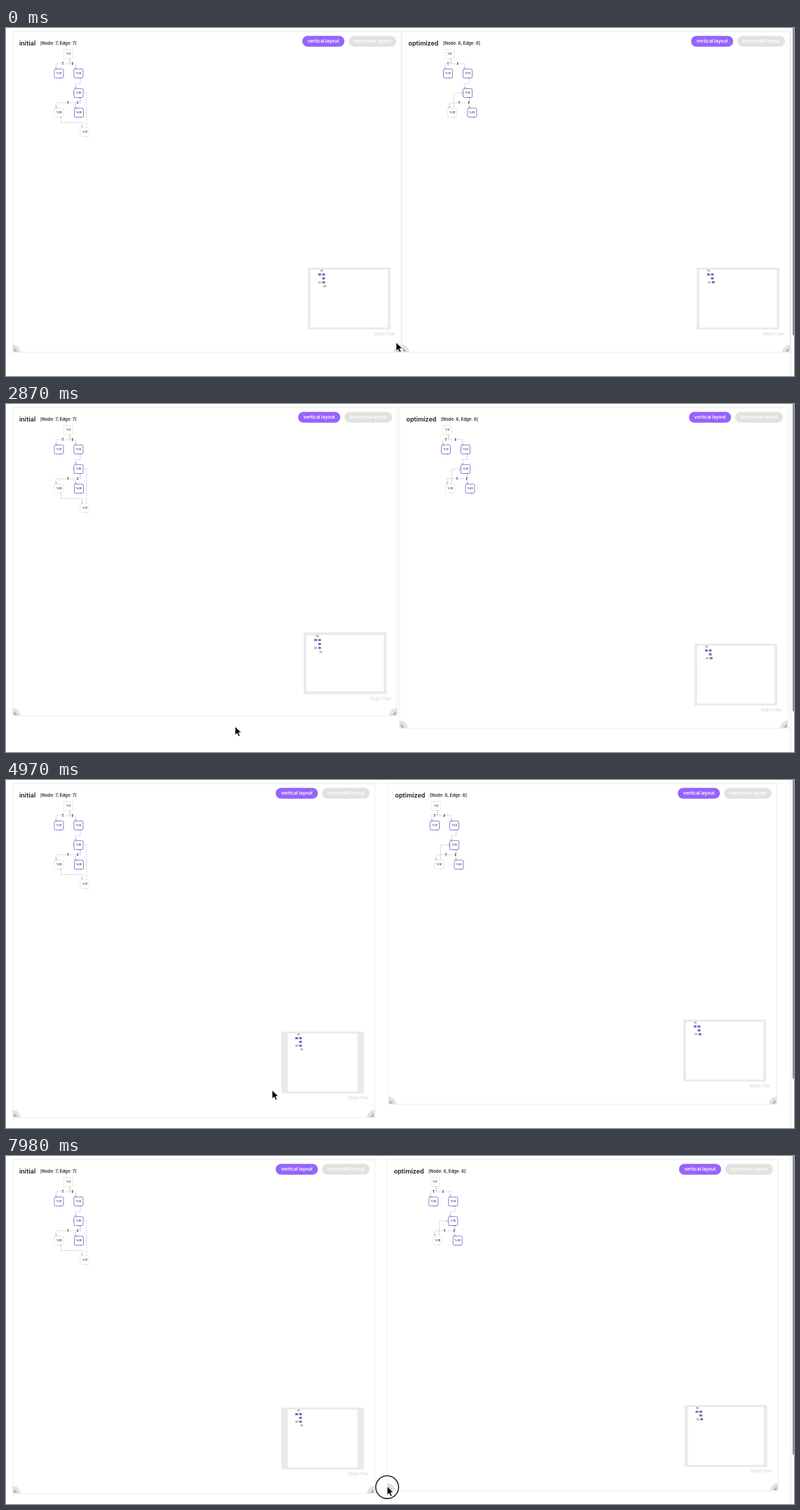
Write an HTML page that moves like this. It is 1125 px wide and 498 px high and loops after 8 s.

```html
<!DOCTYPE html>
<html lang="en">
<head>
<meta charset="utf-8">
<style>
  html, body { margin: 0; width: 100%; height: 100%; overflow: hidden; background: #fff; }
  svg { display: block; width: 1125px; height: 498px; font-family: Inter, sans-serif; }
  .frame { fill: #fff; stroke: #ececec; stroke-width: .9; }
  .title { font-size: 9px; font-weight: 600; fill: #1d1d1f; }
  .count { font-size: 6.1px; font-weight: 600; fill: #2b2b2b; }
  .button { font-size: 6.55px; font-weight: 600; fill: #fff; text-anchor: middle; }
  .credit { font-size: 5.7px; fill: #d2d2d2; text-anchor: end; }
  .edge { fill: none; stroke: #a5a3ad; stroke-width: .75; stroke-dasharray: 1.55; }
  .edge.violet { stroke: #a596d8; }
  .node { fill: #fff; stroke: #dcdcdc; stroke-width: .6; }
  .node.active { stroke: #7657d6; stroke-width: .8; }
  .name { font-size: 3.7px; font-weight: 600; fill: #333; text-anchor: middle; }
  .branch { font-size: 4.6px; font-weight: 700; fill: #222; text-anchor: middle; }
  .mark { fill: none; stroke: #777; stroke-width: .9; }
</style>
</head>
<body>
<svg id="stage" viewBox="0 0 1125 498">
  <defs>
    <marker id="tip" markerUnits="userSpaceOnUse" markerWidth="4" markerHeight="4" refX="1.6" refY="2" orient="auto">
      <path d="M.6 .6L2.1 2L.6 3.4" fill="none" stroke="#8c8a94" stroke-width=".7"/>
    </marker>
    <clipPath id="page"><rect width="1120" height="498"/></clipPath>
  </defs>
  <path d="M9.5 4.8H1110.5V0" fill="none" stroke="#f0f0f0" stroke-width=".8"/>
  <g id="panels" clip-path="url(#page)"></g>
  <path d="M1120.5 0V498" stroke="#e6e6e6"/>
  <rect id="thumb" x="1123" y="-4" width="4" rx="2" fill="#8f8f8f"/>
  <g id="pointer">
    <circle id="ring" r="16.3" fill="none" stroke="#111" stroke-width="1.4"/>
    <path id="arrow" d="M0 -1V11.2L2.9 8.5L4.9 13L7 12.1L5 7.7H8.8Z" fill="#000" stroke="#fff" stroke-width=".7"/>
    <path id="resize" d="M-2.2 -2.5L2.9 -1.9L1.4 -.6L4 1.8L5.4 .5L6 6.1L.5 5.4L1.9 4L-.7 1.5L-2 2.9Z" fill="#000" stroke="#fff" stroke-width=".4"/>
  </g>
</svg>
<script>
const LOOP = 8000, STEP = 70, LEFT = 9.5, TOP = 5.5, RIGHT = 1120;
const byId = id => document.getElementById(id);

function add(parent, tag, attrs, text) {
  const el = document.createElementNS('http://www.w3.org/2000/svg', tag);
  set(el, attrs);
  if (text) el.textContent = text;
  return parent.appendChild(el);
}
function set(el, attrs) {
  for (const key in attrs) el.setAttribute(key, attrs[key]);
}
const move = (el, x, y) => el.setAttribute('transform', `translate(${x} ${y})`);

// Pointer path: time, x, y
const path = [
  [0, 557, 451], [560, 558, 462], [910, 556.5, 465], [1260, 557.3, 474], [1450, 559, 477],
  [1700, 566, 380], [1850, 575, 325], [1960, 582, 339], [2030, 587.5, 351], [2250, 575, 400],
  [2480, 550.5, 447], [2600, 545, 448], [2900, 300, 463], [3200, 40, 445], [3360, 22.5, 440],
  [3710, 101, 364], [3780, 101, 364], [4000, 98, 380], [4200, 75, 440], [4400, 56, 472],
  [4520, 54.5, 477], [4700, 80, 478], [4970, 380, 445], [5300, 530, 452], [5880, 549, 458],
  [6200, 540, 420], [6440, 525, 358], [6510, 517, 352], [6790, 509, 335], [7150, 515, 370],
  [7560, 537, 446], [7910, 545.5, 473], [8000, 544, 474]
];

// Cubic interpolation whose tangents vanish at turning points
function slope(i, axis) {
  const a = path[i - 1], b = path[i], c = path[i + 1];
  if (!a || !c) return 0;
  const before = (b[axis] - a[axis]) / (b[0] - a[0]);
  const after = (c[axis] - b[axis]) / (c[0] - b[0]);
  return before * after > 0 ? 2 * before * after / (before + after) : 0;
}
function pointerAt(t) {
  let i = 0;
  while (i < path.length - 2 && path[i + 1][0] < t) i++;
  const span = path[i + 1][0] - path[i][0], u = (t - path[i][0]) / span, v = 1 - u;
  const [x, y] = [1, 2].map(axis =>
    v * v * (1 + 2 * u) * path[i][axis] + u * u * (3 - 2 * u) * path[i + 1][axis] +
    span * u * v * (v * slope(i, axis) - u * slope(i + 1, axis)));
  return { x, y };
}

const drags = [[910, 2480], [3360, 4520], [5880, 8000]];
function dragged(index, t) {
  const [from, to] = drags[index], start = pointerAt(from);
  const now = pointerAt(Math.min(to, Math.max(from, t - STEP)));
  return { x: now.x - start.x, y: now.y - start.y };
}

const graphs = [
  {
    title: 'initial', count: '[Node: 7, Edge: 7]', countX: 39.5,
    nodes: [['%0', 79.5, 37], ['%12', 66, 65, 1], ['%14', 94, 65, 1], ['%15', 94, 93, 1],
      ['%18', 66, 121], ['%28', 94.5, 121, 1], ['%31', 103, 149]],
    edges: ['M81.5 43V51H62V57', 'M81.5 43V51H90V57', 'M96.5 100V107H62V113',
      'M69 128V135.5H99V141', 'M105.5 156V93H86h1'],
    violet: ['M96.5 72V79.5H90V85', 'M96.5 100V107H90V113'],
    labels: [['T', 71.5, 51], ['F', 85.5, 51], ['T', 79, 107], ['F', 93, 107]]
  },
  {
    title: 'optimized', count: '[Node: 6, Edge: 6]', countX: 59,
    nodes: [['%0', 68, 37], ['%12', 66, 65, 1], ['%14', 94, 65, 1], ['%15', 94, 93, 1],
      ['%18', 72, 121], ['%33', 100.5, 121, 1]],
    edges: ['M70 43V51H62V57', 'M70 43V51H90V57', 'M96.5 100V107H68V113', 'M74.5 128V93H86'],
    violet: ['M96.5 72V79.5H90V85', 'M96.5 100V113'],
    labels: [['T', 66, 51], ['F', 80, 51], ['T', 82, 107], ['F', 96, 107]]
  }
];

function makeButton(parent, x, width, fill, text) {
  add(parent, 'rect', { x, y: 11.3, width, height: 15.4, rx: 7.7, fill });
  add(parent, 'text', { class: 'button', x: x + width / 2, y: 21.3 }, text);
}

function makePanel(graph) {
  const root = add(byId('panels'), 'g');
  const frame = add(root, 'rect', { class: 'frame', y: TOP });
  add(root, 'text', { class: 'title', x: 9.5, y: 24.6 }, graph.title);
  add(root, 'text', { class: 'count', x: graph.countX, y: 24.1 }, graph.count);

  for (const d of graph.edges) add(root, 'path', { class: 'edge', d, 'marker-end': 'url(#tip)' });
  for (const d of graph.violet) add(root, 'path', { class: 'edge violet', d, 'marker-end': 'url(#tip)' });
  for (const [text, x, y] of graph.labels) {
    add(root, 'rect', { x: x - 2.5, y: y - 2.5, width: 5, height: 5, fill: '#fff' });
    add(root, 'text', { class: 'branch', x, y: y + 1.7 }, text);
  }
  for (const [text, x, y, active] of graph.nodes) {
    add(root, 'rect', { class: active ? 'node active' : 'node', x: x - 6.5, y: y - 6.3, width: 13, height: 12.8, rx: 1.6 });
    for (const [dx, dy] of [[-4, -6.4], [2.5, 6.7]])
      add(root, 'circle', { cx: x + dx, cy: y + dy, r: .6, fill: active ? '#555' : '#bbb' });
    add(root, 'text', { class: 'name', x, y: y + 1.4 }, text);
  }

  const buttons = add(root, 'g');
  makeButton(buttons, -141.5, 60.2, '#9564fc', 'vertical layout');
  makeButton(buttons, -75.3, 68, '#e2e2e2', 'horizontal layout');

  const map = add(root, 'g');
  add(map, 'rect', { width: 118, height: 88.5, fill: '#eaeaea' });
  const view = add(map, 'rect', { fill: '#fff' });
  const dots = graph.nodes.map(node =>
    add(map, 'rect', { width: 4, height: 3, rx: .5, fill: node[3] ? '#8064bd' : '#bdbdbd' }));
  add(map, 'text', { class: 'credit', x: 124.5, y: 97 }, 'React Flow');

  const corners = [1, -1].map(side => {
    const corner = add(root, 'g');
    add(corner, 'path', { d: `M0 0V-11A11 11 0 0 ${side > 0 ? 1 : 0} ${11 * side} 0Z`, fill: '#e3e3e3' });
    add(corner, 'path', { class: 'mark', d: `M${2.8 * side} -5.6V-2H${6 * side}` });
    return corner;
  });

  return (x, width, bottom) => {
    const height = bottom - TOP, flow = .905 * height;
    const scale = Math.max(width / 110.6, flow / 83);
    const viewX = 59 - width / scale / 2, viewY = 44.25 - flow / scale / 2;
    move(root, x, 0);
    set(frame, { width, height });
    move(buttons, width, 0);
    move(map, width - 133.5, 18.8 + .9 * height - 88.5);
    set(view, { x: viewX, y: viewY, width: width / scale, height: flow / scale });
    dots.forEach((dot, i) => {
      const [, nx, ny] = graph.nodes[i];
      set(dot, { x: viewX + nx / scale - 2, y: viewY + (ny - 30.5) / scale - 1.5 });
    });
    corners.forEach((corner, i) => move(corner, i * width, bottom));
  };
}

const [placeInitial, placeOptimized] = graphs.map(makePanel);
const edges = document.querySelectorAll('.edge');

function draw(t) {
  const first = dragged(0, t), second = dragged(1, t), third = dragged(2, t);
  const width = 555 + first.x - second.x, bottom = 464 + first.y + second.y;
  const otherWidth = 554.5 - third.x, otherBottom = 464 + third.y;
  const free = RIGHT - LEFT - width - otherWidth;
  placeInitial(LEFT, width, bottom);
  placeOptimized(LEFT + width + Math.max(0, free / 2), otherWidth, otherBottom);

  const extra = Math.max(0, bottom - 464, otherBottom - 464);
  set(byId('thumb'), { height: 444 - .64 * extra - (free < -5 ? 19 : 0) });

  const offset = 3.1 * (1 - t % 500 / 500);
  edges.forEach(edge => edge.style.strokeDashoffset = offset);

  const { x, y } = pointerAt(t);
  const pressed = drags.some(([from, to]) => t >= from - 30 && t <= to + 20);
  const resizing = t >= 880 && t <= 2500;
  const show = (id, on) => byId(id).style.display = on ? '' : 'none';
  move(byId('pointer'), x, y);
  show('ring', pressed);
  show('resize', resizing);
  show('arrow', !resizing);
}

function tick(now) {
  draw(Math.floor(now % LOOP / STEP) * STEP);
  requestAnimationFrame(tick);
}
draw(0);
requestAnimationFrame(tick);
</script>
</body>
</html>
```
